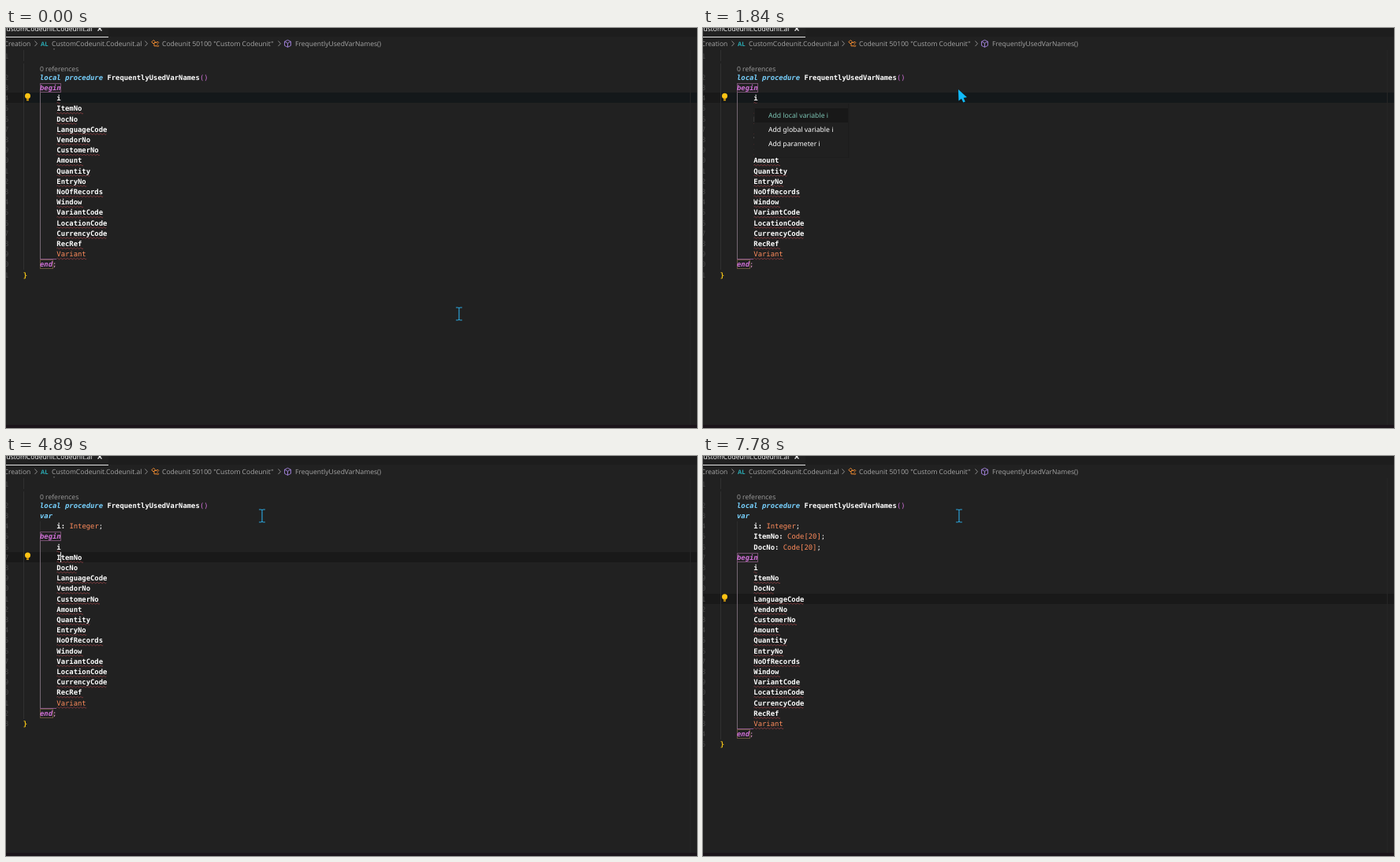
Recreate the animation shown at these times as an HTML page. Size 877 by 508 pixels, loop 8000 ms.

```html
<!DOCTYPE html>
<html lang="en">
<head>
<meta charset="utf-8">
<title>Add variable quick fix</title>
<style>
  html, body { margin: 0; width: 100%; height: 100%; overflow: hidden; background: #212121; }
  svg { display: block; }
  text { white-space: pre; text-rendering: geometricPrecision; }
  .code { font: 8.87px "DejaVu Sans Mono", monospace; }
  .ui { font: 8.55px "Open Sans", "Noto Sans", sans-serif; }
  .item { font: 500 8.63px "Noto Sans", "Open Sans", sans-serif; }
  .b { font-weight: bold; }
  .i { font-style: italic; }
</style>
</head>
<body>
<svg id="stage" width="877" height="508" viewBox="0 0 877 508">
  <rect width="877" height="508" fill="#212121"/>
  <g id="editor"></g>
  <g id="header">
    <path d="M130 0H877V11H130Z" fill="#1d1d1d"/>
    <path d="M0 11.5H130" stroke="#e4e4e4"/>
    <g class="ui">
      <text x="-5" y="4.2" fill="#fff" style="font-weight:500">CustomCodeunit.Codeunit.al</text>
      <path d="M116.5 -1.5L121.5 3.5M121.5 -1.5L116.5 3.5" stroke="#fff" stroke-width="1.2"/>
      <g fill="#a6a6a6">
        <text x="-2.5" y="22.9">Creation</text>
        <text x="58" y="22.9">CustomCodeunit.Codeunit.al</text>
        <text x="198" y="22.9">Codeunit 50100 "Custom Codeunit"</text>
        <text x="367" y="22.9">FrequentlyUsedVarNames()</text>
      </g>
      <text x="44" y="22.7" class="b" fill="#2aa7b0" style="font-size:7.6px">AL</text>
    </g>
    <path d="M36.500 16.500l3 3.300l-3 3.300M176.500 16.500l3 3.300l-3 3.300M345.500 16.500l3 3.300l-3 3.300" fill="none" stroke="#999" stroke-width=".9"/>
    <path d="M184.800 17.800l2.500 -2.500l2.200 2.200l-2.500 2.500zM188.500 18.500h2.500M188 19v3.800h3M191 18.300l1.300 -1.300l1.500 1.500l-1.300 1.300zM191 22.500l1.300 -1.300l1.500 1.500l-1.300 1.300z" fill="none" stroke="#f08a30"/>
    <path d="M357.500 15.300l4 2v5l-4 2l-4 -2v-5zM353.500 17.300l4 2l4 -2M357.500 19.300v5" fill="none" stroke="#a585e0" stroke-width=".9"/>
  </g>
  <path d="M0 504H877V508H0Z" fill="#1b151a"/>
  <path d="M868.500 28V504" stroke="#252525"/>
  <g id="menu"></g>
  <path id="beam" fill="none" stroke="#2ba0d4" stroke-width="1.2" d="M-4 -8H-1.2L0 -7L1.2 -8H4M0 -7V7M-4 8H-1.2L0 7L1.2 8H4"/>
  <path id="arrow" fill="#10bafa" d="M324 78L324.500 92.500L328 89.800L330.300 94.500L332.800 93.400L330.600 88.800L335 88Z"/>
</svg>
<script>
const LOOP = 8000, COL = 5.34, ROW = 13.2, LEFT = 43, TOP = 62.5;
const names = ["i", "ItemNo", "DocNo", "LanguageCode", "VendorNo", "CustomerNo", "Amount", "Quantity",
  "EntryNo", "NoOfRecords", "Window", "VariantCode", "LocationCode", "CurrencyCode", "RecRef", "Variant"];
const types = ["Integer", "Code[20]", "Code[20]"];
const WHITE = "#ffffff", CYAN = "#78d2ff", PURPLE = "#d070d8", ORANGE = "#ff8c5c";

// pointer positions, one per 75.7 ms
const STEP = 75.7;
const trail = [[575, 363], [560, 350], [480, 288], [345, 190], [205, 98], [95, 38], [24, 20], [58, 48],
  [96, 81], [92, 86], [86, 91], [82, 94], [110, 93], [210, 86], [300, 78], [325, 76]];

const $ = id => document.getElementById(id);
const within = (t, spans) => spans.some(([a, b]) => t >= a && t < b);
const count = (t, times) => times.filter(x => t >= x).length;
const rowY = r => TOP + r * ROW;
const colX = c => LEFT + c * COL;

const text = (x, y, str, fill, cls = "code") =>
  `<text x="${x.toFixed(2)}" y="${y.toFixed(2)}" fill="${fill}" class="${cls}">${str}</text>`;
const code = (col, row, str, fill, style = "") => text(colX(col), rowY(row) + 3.3, str, fill, "code " + style);
const rect = (x, y, w, h, attrs) => `<rect x="${x}" y="${y}" width="${w}" height="${h}" ${attrs}/>`;
const line = (d, color) => `<path d="${d}" fill="none" stroke="${color}"/>`;

function squiggle(row, len) {
  const y = rowY(row) + 6.2, waves = Math.max(1, Math.round(len * COL / 4.2));
  return `<path d="M64.4 ${y}${"q1.05 -1.6 2.1 0t2.1 0".repeat(waves)}" fill="none" stroke="#b0484c" stroke-width=".65"/>`;
}

function bulb(row) {
  const y = rowY(row) - 2.6;
  return `<circle cx="27.5" cy="${y}" r="3.5" fill="#ffc414"/>` +
    rect(26, y + 2, 3, 4, 'fill="#f0b010"') + rect(26, y + 4, 3, 0.8, 'fill="#6b5210"');
}

function state(t) {
  const active = count(t, [3640, 5520, 7300]);
  const lamp = count(t, [3870, 5750, 7540]);
  return {
    vars: count(t, [2470, 4980, 6920]),
    active, lamp,
    wide: within(t, [[2470, 3100]]),
    caret: within(t, [[910, 1370], [2380, 2930], [3400, 4100], [4890, 5440], [5520, 5980], [6850, 7780]]),
    menu: within(t, [[1840, 2380], [4420, 4890], [6300, 6850]]),
    arrow: within(t, [[1840, 2380], [4420, 4890], [6300, 6770]]),
    lens: within(t, [[3400, 3870]]) ? "no commands" : "0 references",
    band: t < 2470 ? "#14181a" : "#191919"
  };
}

function drawEditor(s) {
  const begin = s.vars ? s.vars + 2 : 1, first = begin + 1, end = first + names.length;
  const here = first + s.active;
  const yb = Math.round(rowY(begin)), ye = Math.round(rowY(end)), yh = Math.round(rowY(here) - 6.6);
  let out = rect(0, yh, 22, 13, 'fill="#191919"') + rect(22, yh, 855, 13, `fill="${s.band}"`);

  out += text(-2, 38.8, "1", "#484848");
  for (let r = 0; r <= end + 1; r++) out += text(-2, rowY(r) + 3.3, (r + 2) % 10, "#484848");

  out += line(`M22.5 28V42M22.5 45V${ye + 7}`, "#303030");
  if (s.vars) out += line(`M43.5 ${rowY(1) + 7}V${yb - 7}`, "#2c2c2c");
  if (s.wide) out += line(`M64.5 ${rowY(2) - 6}V${rowY(2) + 6}`, "#343434");
  out += line(`M43.5 ${yb + 6}V${ye - 6.5}`, "#746873");
  out += line(`M43 ${ye - 6.5}H64`, "#8a5588");
  out += rect(43.5, yb - 5.5, 26, 11, 'fill="none" stroke="#74506f"');
  out += rect(43.5, ye - 5.5, 16, 11, 'fill="none" stroke="#66543d"');

  out += rect(60, 26, 2, 1.5, 'fill="#555"');
  out += text(LEFT, 54.8, s.lens, "#a0a0a0", "ui");
  out += code(0, 0, "local procedure", CYAN, "b i");
  out += code(16, 0, "FrequentlyUsedVarNames", WHITE, "b") + code(38, 0, "()", PURPLE);
  if (s.vars) out += code(0, 1, "var", CYAN, "b i");
  for (let v = 0; v < s.vars; v++) {
    const col = s.wide ? 8 : 4, n = names[v].length, type = types[v];
    out += code(col, v + 2, names[v] + ":", WHITE, "b");
    out += code(col + n + 2, v + 2, type, ORANGE);
    out += code(col + n + 2 + type.length, v + 2, ";", WHITE);
  }
  out += code(0, begin, "begin", PURPLE, "b i");
  names.forEach((name, k) => {
    const last = k === names.length - 1;
    out += squiggle(first + k, name.length);
    out += code(4, first + k, name, last ? ORANGE : WHITE, last ? "" : "b");
  });
  out += code(0, end, "end", PURPLE, "b i") + code(3, end, ";", "#e59acd");
  out += code(-4, end + 1, "}", "#f5c518", "b");
  out += bulb(first + s.lamp);
  if (s.caret) out += rect(69, Math.round(rowY(here) - 6.5), 1, 13, 'fill="#e4e4e4"');
  $("editor").innerHTML = out;
  return rowY(here);
}

function drawMenu(s, y) {
  const box = $("menu");
  if (!s.menu) return void (box.innerHTML = "");
  const items = ["local variable", "global variable", "parameter"];
  box.innerHTML = items.map((kind, k) =>
    text(83, y + 25.1 + 18 * k, `Add ${kind} ${names[s.active]}`, k ? "#ffffff" : "#7cc4b4", "item")).join("");
  const widest = Math.max(...[...box.children].map(el => el.getComputedTextLength()));
  const w = Math.round(widest + 37), top = Math.round(y + 7);
  const back = rect(64.5, top, w + 2, 69, 'fill="#1b1b1b" opacity=".6"') +
    rect(65, top, w, 68, 'fill="#202020"') + rect(66, top + 6, w - 1, 18, 'fill="#181818"');
  box.insertAdjacentHTML("afterbegin", back);
}

let shown = "";
function render(t) {
  const s = state(t), key = JSON.stringify(s);
  if (key !== shown) {
    shown = key;
    drawMenu(s, drawEditor(s));
    $("arrow").style.display = s.arrow ? "" : "none";
    $("beam").style.display = s.arrow ? "none" : "";
  }
  const [x, y] = trail[Math.min(trail.length - 1, Math.floor((t + 7) / STEP))];
  $("beam").setAttribute("transform", `translate(${x} ${y})`);
}

const start = performance.now();
function tick() {
  render((performance.now() - start) % LOOP);
  requestAnimationFrame(tick);
}
tick();
</script>
</body>
</html>
```
